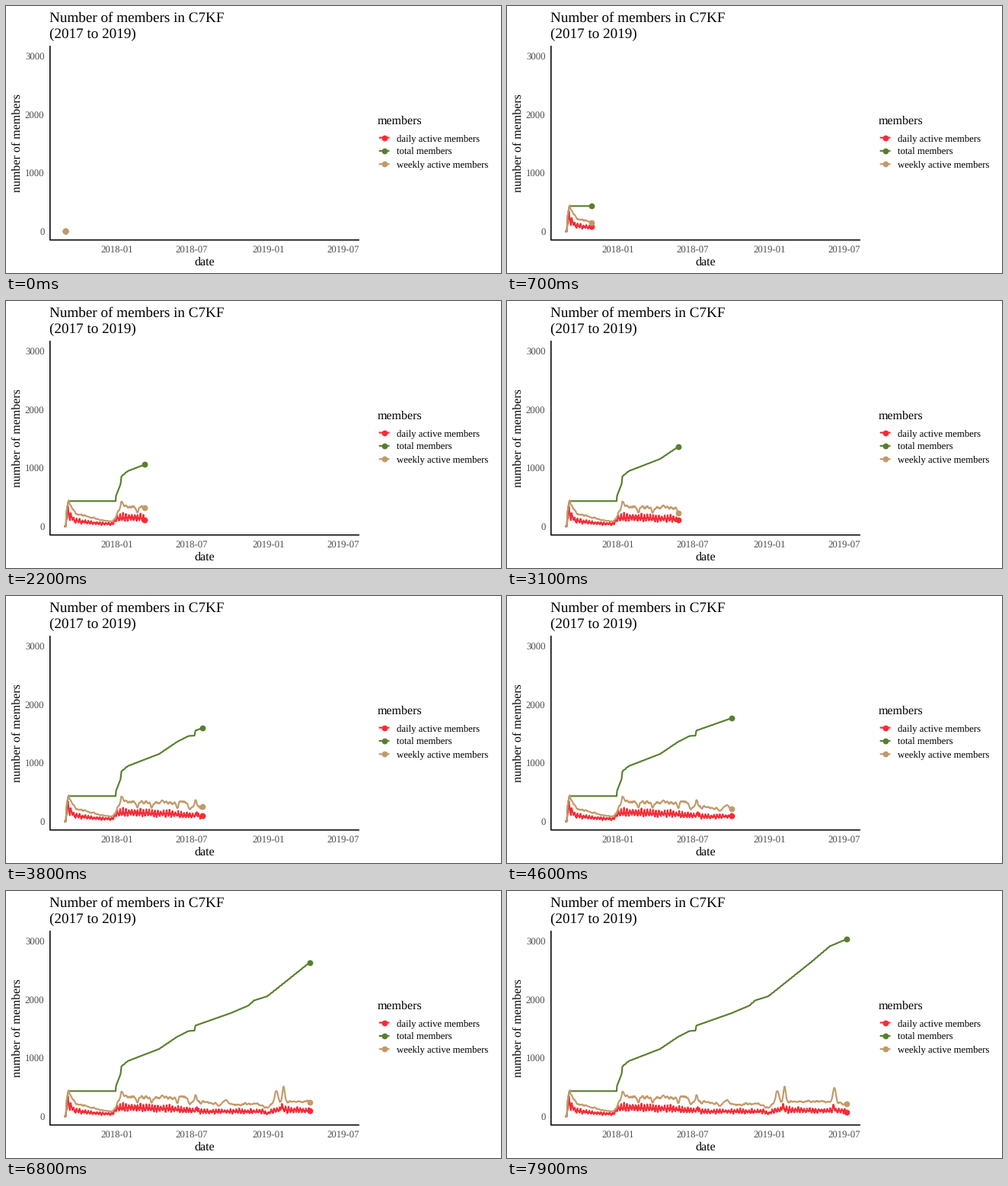
A matplotlib script that plays this animation: 650 px wide and 350 px high, repeating every 10 s.

```python
import numpy as np
import matplotlib.pyplot as plt
from matplotlib.animation import FuncAnimation

WIDTH, HEIGHT, DPI = 650, 350, 100
PX = 72 / DPI  # one pixel in points
FRAMES, INTERVAL = 100, 100
RED, GREEN, TAN = "#FB2A35", "#587F2D", "#C29A69"

plt.rcParams["font.family"] = "Liberation Serif"
plt.rcParams["text.hinting"] = "none"

X_START, X_END, LAST_DAY = 76.4, 445.6, 678
Y_ZERO, Y_SCALE = 295.4, 0.0765
FIRST_REVEAL, REVEAL_STEP = 78.4, 4.717
days = np.arange(LAST_DAY + 1)
weekday = (days - 127) % 7  # 0 is Monday
x = np.linspace(X_START, X_END, LAST_DAY + 1)
rng = np.random.default_rng(4)


def to_y(members):
    return Y_ZERO - Y_SCALE * members


def through(*knots, at=days):
    return np.interp(at, *zip(*knots))


def bump(day, height, width):
    return height * np.exp(-(((days - day) / width) ** 2))


def total_members():
    # sign-ups come in weekly steps after the relaunch
    steps = np.where(days > 139, 0.7 * np.sin(2 * np.pi * days / 7), 0)
    return through(
        (4, 0), (6, 265), (10, 433), (124, 433), (125, 522), (136, 724),
        (138, 855), (153, 946), (229, 1155), (272, 1361), (300, 1463),
        (314, 1469), (317, 1557), (402, 1770), (444, 1897), (458, 1986),
        (490, 2058), (512, 2182), (593, 2642), (638, 2914), (678, 3034),
        at=days + steps)


def weekly_members():
    level = through(
        (4, 0), (6, 265), (11, 430), (28, 220), (84, 115), (115, 85),
        (125, 170), (138, 370), (160, 325), (290, 335), (325, 260),
        (375, 190), (460, 220), (490, 143), (505, 235), (600, 265), (678, 208))
    events = (bump(138, 45, 3) + bump(177, -90, 3) + bump(211, -110, 4)
              + bump(272, -105, 4) + bump(304, -95, 8) + bump(317, 110, 3)
              + bump(388, 90, 8) + bump(512, 200, 5) + bump(529, 275, 4)
              + bump(649, 260, 5))
    drift = np.convolve(rng.normal(0, 0.1, len(days)), np.ones(5) / 5, "same")
    return level * (1 + drift) + events


def daily_members():
    level = through(
        (4, 0), (6, 190), (10, 235), (25, 95), (80, 52), (115, 42), (125, 110),
        (131, 150), (260, 130), (335, 86), (480, 84), (490, 45), (500, 90),
        (520, 118), (600, 97), (678, 98))
    # busy early in the week, quiet at weekends
    rhythm = np.array([0.12, 0.4, 0.08, 0, -0.08, -0.35, -0.3])[weekday]
    strength = rng.uniform(0.6, 1.25, LAST_DAY // 7 + 2)[(days + 6) // 7]
    noise = rng.normal(0, 0.07, len(days))
    events = bump(320, 80, 1.5) + bump(525, 120, 1.5) + bump(647, 90, 2.5)
    return level * (1 + rhythm * strength + noise) + events


SERIES = [
    ("daily active members", RED, to_y(daily_members())),
    ("total members", GREEN, to_y(total_members())),
    ("weekly active members", TAN, to_y(weekly_members())),
]

fig = plt.figure(figsize=(WIDTH / DPI, HEIGHT / DPI), dpi=DPI, facecolor="white")
ax = fig.add_axes([0, 0, 1, 1])
ax.set(xlim=(0, WIDTH), ylim=(HEIGHT, 0))
ax.axis("off")


def label(px, py, text, size, ha="left", color="black", **kwargs):
    ax.text(px, py, text, fontsize=size * PX, ha=ha, va="baseline",
            color=color, **kwargs)


def stroke(xs, ys, color, width, zorder=2, cap="butt"):
    return ax.plot(xs, ys, color=color, lw=width * PX, zorder=zorder, snap=False,
                   solid_capstyle=cap, solid_joinstyle="round")[0]


def dot(px, py, color):
    return ax.plot([px], [py], "o", ms=7.8 * PX, color=color, mew=0,
                   zorder=4, snap=False)[0]


# Axes and titles
stroke([57.8, 57.8], [52.1, 306.7], "black", 1.55)
stroke([57.1, 464], [306.7, 306.7], "black", 1.55)
label(57.2, 21.3, "Number of members in C7KF", 19.2)
label(57.2, 42, "(2017 to 2019)", 19.2)
label(261, 339.6, "date", 16, ha="center")
label(19.2, 180, "number of members", 16, ha="center", rotation=90,
      rotation_mode="anchor")
for value in range(0, 4000, 1000):
    label(50.4, to_y(value) + 4.4, str(value), 12.8, "right", "#4D4D4D")
for px, month in [(145.4, "2018-01"), (244.1, "2018-07"),
                  (344.3, "2019-01"), (443, "2019-07")]:
    label(px, 323.3, month, 12.8, "center", "#4D4D4D")

# Legend
label(487.5, 155, "members", 16)
for row, (name, color, _) in enumerate(SERIES):
    py = 172.6 + 17.3 * row
    stroke([489.7, 503.5], [py, py], color, 2.13)
    dot(496.6, py, color)
    label(513, py + 4.2, name, 12.8)

lines = [stroke([], [], color, 2.13, zorder=3) for _, color, _ in SERIES]
dots = [dot(FIRST_REVEAL, Y_ZERO, color) for _, color, _ in SERIES]


def update(frame):
    head = min(FIRST_REVEAL + REVEAL_STEP * frame, X_END)
    shown = x < head
    for (_, _, ys), line, marker in zip(SERIES, lines, dots):
        head_y = np.interp(head, x, ys)
        line.set_data(np.append(x[shown], head), np.append(ys[shown], head_y))
        marker.set_data([head], [head_y])
    return lines + dots


animation = FuncAnimation(fig, update, frames=FRAMES, interval=INTERVAL,
                          init_func=lambda: update(0), repeat=True,
                          repeat_delay=0, blit=False)
plt.show()
```
